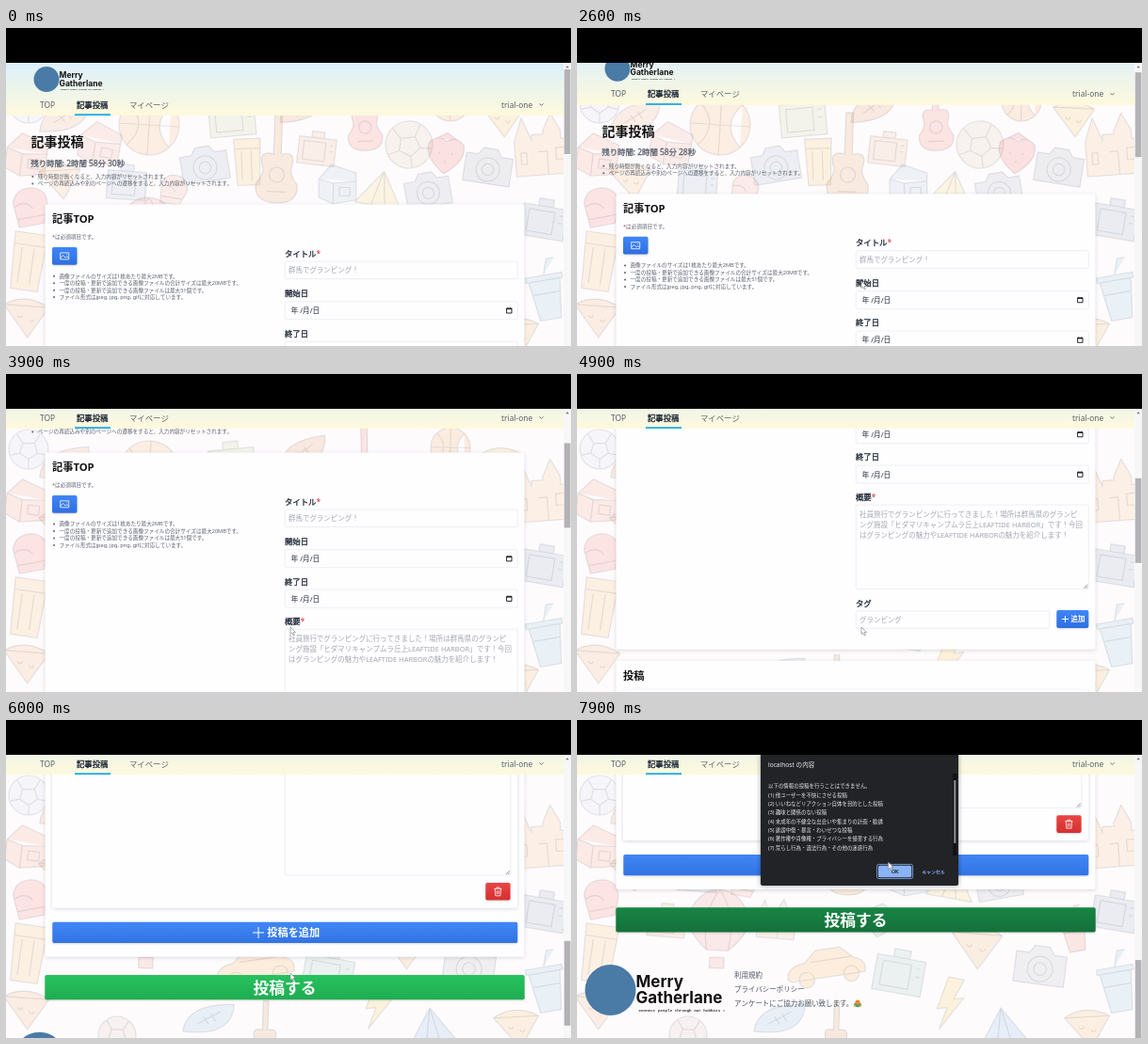
These frames come from a looping animation (600 px wide and 338 px high, 8000 ms). An HTML page with a canvas:

```html
<!DOCTYPE html>
<html lang="ja">
<head>
<meta charset="utf-8">
<title>記事投稿</title>
<style>
html, body { margin: 0; width: 100%; height: 100%; overflow: hidden; background: #000; }
canvas { display: block; width: 600px; height: 338px; }
</style>
</head>
<body>
<canvas id="stage"></canvas>
<script>
const W = 600, H = 338, TOP = 37, LOOP = 8000;
const FONT = '"Noto Sans", "Noto Sans CJK JP", sans-serif';
const dpr = window.devicePixelRatio || 1;
const INK = '#1f2937', GRAY = '#5b626d', PALE = '#a3a8b1', LINE = '#e8e9ed', CARD = '#fefdff';

function makeCanvas(el) {
  el.width = W * dpr;
  el.height = H * dpr;
  const g = el.getContext('2d');
  g.scale(dpr, dpr);
  return g;
}
const c = makeCanvas(document.getElementById('stage'));

// ---------- helpers ----------
// Medium weight is a regular face thickened by a hairline stroke.
function text(s, x, y, size, color = INK, weight = 400, align = 'left', font = FONT) {
  const medium = weight === 500;
  c.font = `${medium ? 400 : weight} ${size}px ${font}`;
  c.fillStyle = c.strokeStyle = color;
  c.textAlign = align;
  c.fillText(s, x, y + size * 0.37);
  if (medium) {
    c.lineWidth = size * 0.035;
    c.strokeText(s, x, y + size * 0.37);
  }
}
function round(g, x, y, w, h, r) {
  g.beginPath();
  g.roundRect(x, y, w, h, r);
}
function shadowBox(x, y, w, h, fill, r = 2.5, blur = 4) {
  c.save();
  c.shadowColor = 'rgba(0,0,0,.14)';
  c.shadowBlur = blur * dpr;
  c.shadowOffsetY = dpr;
  c.fillStyle = fill;
  round(c, x, y, w, h, r);
  c.fill();
  c.restore();
}
function button(x, y, w, h, a, b) {
  const g = c.createLinearGradient(0, y, 0, y + h);
  g.addColorStop(0, a);
  g.addColorStop(1, b);
  shadowBox(x, y, w, h, g, 1.8, 2);
}
function field(x, y, w, h) {
  c.fillStyle = CARD;
  c.strokeStyle = LINE;
  c.lineWidth = 0.7;
  round(c, x, y, w, h, 1.5);
  c.fill();
  c.stroke();
}
function strokePath(d, x, y, color, lw) {
  c.save();
  c.translate(x, y);
  c.strokeStyle = color;
  c.lineWidth = lw;
  c.stroke(new Path2D(d));
  c.restore();
}
const plus = (x, y, r) => strokePath(`M${-r} 0H${r}M0 ${-r}V${r}`, x, y, '#fff', 1);

// ---------- fixed backdrop ----------
const shapes = {
  ball: 'M1 0A1 1 0 1 1 -1 0A1 1 0 1 1 1 0M-.3 -.3L.3 -.3L.45 .2L0 .5L-.45 .2ZM-.3 -.3L-.6 -.8M.3 -.3L.6 -.8M.45 .2L.95 .3M-.45 .2L-.95 .3M0 .5V1',
  hoop: 'M1 0A1 1 0 1 1 -1 0A1 1 0 1 1 1 0M-1 0H1M0 -1V1M-.7 -.7Q0 0 -.7 .7M.7 -.7Q0 0 .7 .7',
  oval: 'M-1.1 .5Q-.9 -.7 1.1 -.6Q1 .8 -1.1 .5ZM-.5 .2L.5 -.3M-.2 -.1L0 .2M.1 -.25L.3 .1',
  camera: 'M-1 -.5H-.5L-.3 -.8H.3L.5 -.5H1V.7H-1ZM.5 .1A.5 .5 0 1 1 -.5 .1A.5 .5 0 1 1 .5 .1M.25 .1A.25 .25 0 1 1 -.25 .1A.25 .25 0 1 1 .25 .1',
  mug: 'M-.6 -.9H.5L.4 1H-.5ZM-.58 -.5H.48M-.3 -.4V.8M.1 -.4V.8',
  guitar: 'M-.1 -1.3H.1V-.2Q.5 -.3 .4 .1Q.3 .3 .55 .6Q.6 1.1 0 1.1Q-.6 1.1 -.55 .6Q-.3 .3 -.4 .1Q-.5 -.3 -.1 -.2ZM.2 .35A.2 .2 0 1 1 -.2 .35A.2 .2 0 1 1 .2 .35M-.25 .8H.25',
  house: 'M-.9 -.2L-.3 -.9L.9 -.5V.8L-.2 1L-.9 .7ZM-.9 -.2L-.2 0L.9 -.1M-.2 0V1M.1 .2H.6V.6H.1Z',
  castle: 'M-1 1V-.2L-.7 -1L-.4 -.2V-.4H0V-.5L.3 -1.1L.6 -.5V-.2H1V1ZM-.8 .2H-.6V.6H-.8ZM-.2 .2H.1V1M.4 .1H.7V.5H.4Z',
  glove: 'M-.7 .9L-.8 -.3Q-.6 -1 .2 -.9Q1 -.7 .8 .1L.5 .9ZM-.7 .5H.6M-.8 -.1Q-.2 -.4 .1 .1',
  balloon: 'M-.3 .6Q-1 0 -.8 -.5Q-.5 -1.1 0 -1.1Q.5 -1.1 .8 -.5Q1 0 .3 .6ZM-.3 .6Q-.5 -.4 0 -1.1Q.5 -.4 .3 .6M-.2 .8H.2V1.1H-.2Z',
  car: 'M-1.3 .3Q-1.3 -.1 -.7 -.15L-.3 -.5H.5L.9 -.1Q1.3 0 1.2 .4H-1.2ZM-.45 .4A.25 .25 0 1 1 -.95 .4A.25 .25 0 1 1 -.45 .4M1 .4A.25 .25 0 1 1 .5 .4A.25 .25 0 1 1 1 .4M-.5 -.15H.8',
  bolt: 'M.1 -1L.7 -.8L.2 -.1H.6L-.5 1L-.1 .2H-.5Z',
  cup: 'M-.6 -.5H.6L.4 1H-.4ZM-.7 -.7H.7V-.5H-.7ZM0 -.7L.2 -1.3H.5M-.5 0H.5',
  berry: 'M0 1Q-1 .3 -.8 -.4Q-.4 -.8 0 -.5Q.4 -.8 .8 -.4Q1 .3 0 1ZM-.5 -.6L0 -.9L.5 -.6M-.3 0V.1M.3 0V.1M0 .4V.5',
  slice: 'M-1 -.5L1 -.3L0 1ZM-1 -.5Q0 -1 1 -.3M-.2 0A.1 .1 0 1 1 -.4 0M.3 .2A.1 .1 0 1 1 .1 .2',
  tent: 'M-1 .7L0 -.8L1 .7ZM0 -.8L-.3 .7M0 -.8L.3 .7',
  box: 'M-.9 -.6H.9V.7H-.9ZM-.65 -.4H.4V.5H-.65ZM.6 -.3H.75M.6 0H.75M-.3 -.6V-.9H.3V-.6'
};
const items = `ball 24 80 21 #d5dbe3|house 22 134 24 #f0a080|glove 26 190 22 #ef7f72|mug 25 247 32 #f2c070
slice 22 305 24 #f0b070|oval 62 95 25 #e9b080|house 100 122 24 #efa890|slice 58 160 22 #f2c079
hoop 152 103 32 #f2b56a|box 128 166 23 #a9bccb|camera 211 146 25 #9fb2c2|glove 178 172 17 #f3a98e
box 240 96 27 #c9cf9a|mug 258 141 26 #f4c560|guitar 288 142 40 #df9f5c|oval 315 84 24 #dc9560
box 330 130 22 #e8b48c|house 352 165 22 #a9c4cf|guitar 381 94 33 #ee7f6a|tent 398 172 25 #f0d272
ball 428 124 25 #dcc9a8|hoop 472 78 21 #f0a860|berry 467 132 23 #ee7168|camera 448 173 24 #a9b4bd
camera 512 148 25 #a5adb5|slice 528 94 22 #f4c35c|castle 571 125 31 #f2bd80|box 571 205 26 #97a9b8
cup 574 282 28 #90c3d6|box 95 215 22 #e6b386|balloon 150 222 38 #f0938c|car 265 260 33 #f2b052
box 342 270 29 #9cc5b5|bolt 395 300 27 #f5c64e|slice 425 238 27 #e9b56f|camera 492 262 27 #aeb7bf
cup 528 225 21 #eb8a72|guitar 275 335 28 #d99a62|oval 215 318 25 #8bb7d5|tent 452 325 24 #85b5d8
berry 322 212 19 #8fc38b|slice 543 325 24 #f0bb68|ball 118 335 20 #d9c4b4|castle 212 212 20 #e9bd92`.split(/[|\n]/);

const backdrop = document.createElement('canvas');
function paintBackdrop() {
  const g = makeCanvas(backdrop);
  g.fillStyle = '#fefbfd';
  g.fillRect(0, 0, W, H);
  items.forEach((row, i) => {
    const [kind, x, y, r, color] = row.split(' ');
    const path = new Path2D(shapes[kind]);
    g.save();
    g.translate(+x, +y);
    g.rotate(Math.sin(i * 2.4) * (kind === 'guitar' ? 0.04 : 0.18));
    g.scale(+r, +r);
    g.globalAlpha = 0.19;
    g.fillStyle = color;
    g.fill(path);
    g.globalAlpha = 0.14;
    g.strokeStyle = '#566072';
    g.lineJoin = 'round';
    g.lineWidth = 1.2 / r;
    g.stroke(path);
    g.restore();
  });
}
paintBackdrop();

// ---------- motion ----------
const scrollKeys = [[2400, 0], [2800, 30], [3100, 54], [3900, 104], [4900, 236], [6000, 674], [6300, 746]];
const slopes = scrollKeys.map((k, i) => {
  const p = scrollKeys[i - 1], n = scrollKeys[i + 1];
  if (!p || !n) return 0;
  const a = (k[1] - p[1]) / (k[0] - p[0]), b = (n[1] - k[1]) / (n[0] - k[0]);
  return 2 * a * b / (a + b);
});
function scrollAt(t) {
  const last = scrollKeys.length - 1;
  if (t <= scrollKeys[0][0]) return 0;
  if (t >= scrollKeys[last][0]) return scrollKeys[last][1];
  const i = scrollKeys.findIndex(k => k[0] > t) - 1;
  const [t0, a] = scrollKeys[i], [t1, b] = scrollKeys[i + 1];
  const d = t1 - t0, u = (t - t0) / d, v = 1 - u;
  return v * v * (1 + 2 * u) * a + u * u * (3 - 2 * u) * b + d * u * v * (v * slopes[i] - u * slopes[i + 1]);
}
function glide(t, from, to) {
  const u = Math.min(1, Math.max(0, (t - from) / (to - from)));
  return u * u * (3 - 2 * u);
}
const DIALOG_AT = 7350;
function pointerAt(t) {
  const enter = glide(t, 1050, 1350), down = glide(t, 6400, 6700), ok = glide(t, 7450, 7800);
  return {
    x: 302 + 3 * down + 25.5 * ok,
    y: 345 - 76 * enter - 55 * down - 63 * ok
  };
}

// ---------- page parts ----------
function logo(x, y, k) {
  c.save();
  c.translate(x, y);
  c.scale(k, k);
  c.fillStyle = '#4a7ba6';
  c.beginPath();
  c.arc(0, 0, 27, 0, 7);
  c.fill();
  const face = 'Inter, sans-serif';
  text('Merry', 27, -9.5, 17, '#111', 700, 'left', face);
  text('Gatherlane', 27, 8, 17, '#111', 700, 'left', face);
  text('Connect people through our hobbies !', 30, 21.5, 4.25, '#333', 700, 'left', '"Liberation Mono", monospace');
  c.restore();
}
function header(s) {
  const y = TOP - Math.min(s, 35);
  const g = c.createLinearGradient(0, y, 0, y + 56);
  g.addColorStop(0, '#dcf0fb');
  g.addColorStop(1, '#fef9dc');
  c.fillStyle = g;
  c.fillRect(0, y, 592, 56);
  logo(43, y + 17.5, 0.5);
  const ny = y + 44.4;
  text('TOP', 36, ny, 8.4, GRAY);
  text('記事投稿', 75, ny, 8.4, INK, 500);
  text('マイページ', 131, ny, 8.4, GRAY);
  text('trial-one', 526, ny, 8.4, GRAY);
  strokePath('M-2 -1L0 1L2 -1', 568.5, ny, GRAY, 0.9);
  c.fillStyle = '#1aa9e6';
  c.fillRect(73, y + 54.3, 38, 1.8);
}
function bullets(lines, x, y) {
  lines.forEach((s, i) => {
    const ly = y + i * 7.47;
    c.fillStyle = GRAY;
    c.beginPath();
    c.arc(x, ly + 0.2, 1, 0, 7);
    c.fill();
    text(s, x + 5.5, ly, 5.6, GRAY);
  });
}
function required(s, x, y) {
  text(s, x, y, 8.4, INK, 500);
  text('*', x + c.measureText(s).width, y, 8.4, '#dc2626');
}
function uploader(x, y) {
  text('*', x, y - 11, 5.6, '#a84848');
  text('は必須項目です。', x + c.measureText('*').width, y - 11, 5.6, GRAY);
  button(x, y, 26.5, 18.8, '#3f86f7', '#2f6ee0');
  strokePath('M-4.5 -3.5H4.5V3.5H-4.5ZM-4.5 2L-1.5 -.8L1 1.8L2.5 .4L4.5 2.2M2.2 -1.6H2.9', x + 13.2, y + 9.4, '#fff', 0.8);
  bullets([
    '画像ファイルのサイズは1枚あたり最大2MBです。',
    '一度の投稿・更新で追加できる画像ファイルの合計サイズは最大20MBです。',
    '一度の投稿・更新で追加できる画像ファイルは最大51個です。',
    'ファイル形式はjpeg, jpg, png, gifに対応しています。'
  ], x + 2, y + 30.5);
}
function dateField(label, y) {
  text(label, 296, y, 8.4, INK, 500);
  field(296.3, y + 8.8, 247, 19);
  text('年 /月/日', 302.7, y + 18.4, 7.6);
  strokePath('M-2.7 -2.2H2.7V2.8H-2.7ZM-2.7 -1.5H2.7M-1.5 -3V-2M1.5 -3V-2', 534.3, y + 18.2, '#111', 0.9);
}
function area(x, y, w, h) {
  field(x, y, w, h);
  strokePath('M-4 0L0 -4M-1.8 0L0 -1.8', x + w - 1, y + h - 1, '#555', 0.6);
}
function articleCard() {
  shadowBox(41.5, 187.5, 509, 341.5, CARD);
  text('記事TOP', 49, 203.3, 11.2, '#111', 700);
  uploader(49, 233);
  required('タイトル', 296, 239.5);
  field(296.3, 248, 247, 18.6);
  text('群馬でグランピング！', 300, 257.5, 7.47, PALE);
  dateField('開始日', 282);
  dateField('終了日', 324.5);
  required('概要', 296, 367);
  area(296.3, 375.3, 247, 89.7);
  [
    '社員旅行でグランピングに行ってきました！場所は群馬県のグランピ',
    'ング施設「ヒダマリキャンプムラ丘上LEAFTIDE HARBOR」です！今回',
    'はグランピングの魅力やLEAFTIDE HARBORの魅力を紹介します！'
  ].forEach((s, i) => text(s, 300, 385 + i * 11.2, 7.47, PALE));
  text('タグ', 296, 480, 8.4, INK, 500);
  field(296.3, 488, 205.5, 18.6);
  text('グランピング', 300, 497.5, 7.47, PALE);
  button(509.3, 487.3, 34, 18.8, '#3f86f7', '#2f6ee0');
  plus(518.5, 496.7, 3.5);
  text('追加', 524.5, 496.7, 7.47, '#fff', 700);
}
function postCard() {
  shadowBox(41.5, 541, 509, 385, CARD);
  text('投稿', 49, 557.5, 11.2, '#111', 700);
  shadowBox(49, 572, 494, 302, CARD);
  uploader(56.5, 603);
  required('タイトル', 296, 609.5);
  field(296.3, 618, 239.5, 18.6);
  required('内容', 296, 652);
  area(296.3, 660.3, 239.5, 179.2);
  button(509.3, 847.3, 26.3, 18.6, '#ea4545', '#d63031');
  strokePath('M-4 -3H4M-1.5 -3V-4.4H1.5V-3M-3.1 -3L-2.6 4.5H2.6L3.1 -3M-1 -1L-.8 2.8M1 -1L.8 2.8', 522.4, 856.6, '#fff', 0.8);
  button(49.3, 889, 494, 22.3, '#4087f6', '#3273e4');
  plus(268, 900.3, 6);
  text('投稿を追加', 277.3, 900.3, 11.2, '#fff', 700);
}
function footer() {
  logo(35.5, 1033, 1);
  ['利用規約', 'プライバシーポリシー', 'アンケートにご協力お願い致します。'].forEach((s, i) =>
    text(s, 167, 1017 + i * 14.9, 7.47, '#4b5563'));
  const dot = (x, y, rx, ry, color) => {
    c.fillStyle = color;
    c.beginPath();
    c.ellipse(x, y, rx, ry, 0, 0, 7);
    c.fill();
  };
  dot(298, 1048.8, 4, 2.4, '#4f9f63');
  dot(298, 1046, 2.6, 2.6, '#e8863a');
  dot(295, 1050.2, 1.2, 0.9, '#f6c445');
  dot(301, 1050.2, 1.2, 0.9, '#f6c445');
}
function scrollbar(s) {
  c.fillStyle = '#f7f7f8';
  c.fillRect(592, TOP, 8, H - TOP);
  c.fillStyle = '#777';
  c.fill(new Path2D('M594.3 42.3H597.9L596.1 40Z'));
  c.fillStyle = '#b3b3b5';
  c.fillRect(592.8, 44 + s * 0.283, 6.6, 90);
}
function dialog() {
  c.save();
  c.shadowColor = 'rgba(0,0,0,.4)';
  c.shadowBlur = 5 * dpr;
  c.fillStyle = '#222327';
  round(c, 195, TOP, 210, 139, [0, 0, 2, 2]);
  c.fill();
  c.restore();
  text('localhost の内容', 203, 47.5, 6.6, '#e8eaed');
  [
    '以下の情報の投稿を行うことはできません。',
    '(1) 他ユーザーを不快にさせる投稿',
    '(2) いいねなどリアクション自体を目的とした投稿',
    '(3) 趣味と関係のない投稿',
    '(4) 未成年の不健全な出会いや集まりの計画・勧誘',
    '(5) 誹謗中傷・暴言・わいせつな投稿',
    '(6) 著作権や肖像権・プライバシーを侵害する行為',
    '(7) 荒らし行為・違法行為・その他の迷惑行為'
  ].forEach((s, i) => text(s, 203, 70.2 + i * 9.37, 5.45, '#e8eaed'));
  c.fillStyle = '#111214';
  c.fillRect(399.3, 57, 4, 87);
  c.fillStyle = '#8d9094';
  c.fillRect(400.3, 64, 2, 67);
  c.strokeStyle = '#8ab4f8';
  c.lineWidth = 0.8;
  round(c, 318.6, 153.4, 38, 15.2, 2);
  c.stroke();
  c.fillStyle = '#8ab4f8';
  round(c, 320, 154.8, 35.2, 12.4, 1.5);
  c.fill();
  text('OK', 337.6, 161.2, 5.6, '#202124', 500, 'center');
  text('キャンセル', 378.5, 161.2, 4.8, '#8ab4f8', 500, 'center');
}
function pointer(p) {
  c.save();
  c.translate(p.x, p.y);
  c.lineWidth = 0.6;
  c.strokeStyle = '#777';
  c.fillStyle = '#fff';
  const arrow = new Path2D('M0 0V7.6L1.8 6L3.1 8.9L4.4 8.3L3.1 5.5H5.5Z');
  c.fill(arrow);
  c.stroke(arrow);
  c.restore();
}

function draw(t) {
  const s = scrollAt(t), p = pointerAt(t), open = t >= DIALOG_AT;
  c.fillStyle = '#000';
  c.fillRect(0, 0, W, H);
  c.save();
  c.beginPath();
  c.rect(0, TOP, W, H - TOP);
  c.clip();
  c.drawImage(backdrop, 0, 0, W, H);

  c.save();
  c.translate(0, -s);
  text('記事投稿', 26.5, 121.3, 14, '#111', 700);
  const secs = 30 - Math.max(0, Math.floor((t + 300) / 1000));
  text(`残り時間: 2時間 58分 ${secs}秒`, 26.3, 143.6, 8.4, GRAY, 500);
  bullets([
    '残り時間が無くなると、入力内容がリセットされます。',
    'ページの再読込みや別のページへの遷移をすると、入力内容がリセットされます。'
  ], 28.3, 157.8);
  articleCard();
  postCard();
  const hover = open || (p.x > 41 && p.x < 550 && p.y + s > 945 && p.y + s < 971.5);
  button(41.3, 945.3, 509.4, 26.2, hover ? '#178544' : '#27c25f', hover ? '#14713a' : '#1fac51');
  text('投稿する', 296, 958.7, 16.8, '#fff', 700, 'center');
  footer();
  c.restore();

  header(s);
  scrollbar(s);
  if (open) dialog();
  pointer(p);
  c.restore();
}

const start = performance.now();
function tick() {
  draw((performance.now() - start) % LOOP);
  requestAnimationFrame(tick);
}
tick();
</script>
</body>
</html>
```
